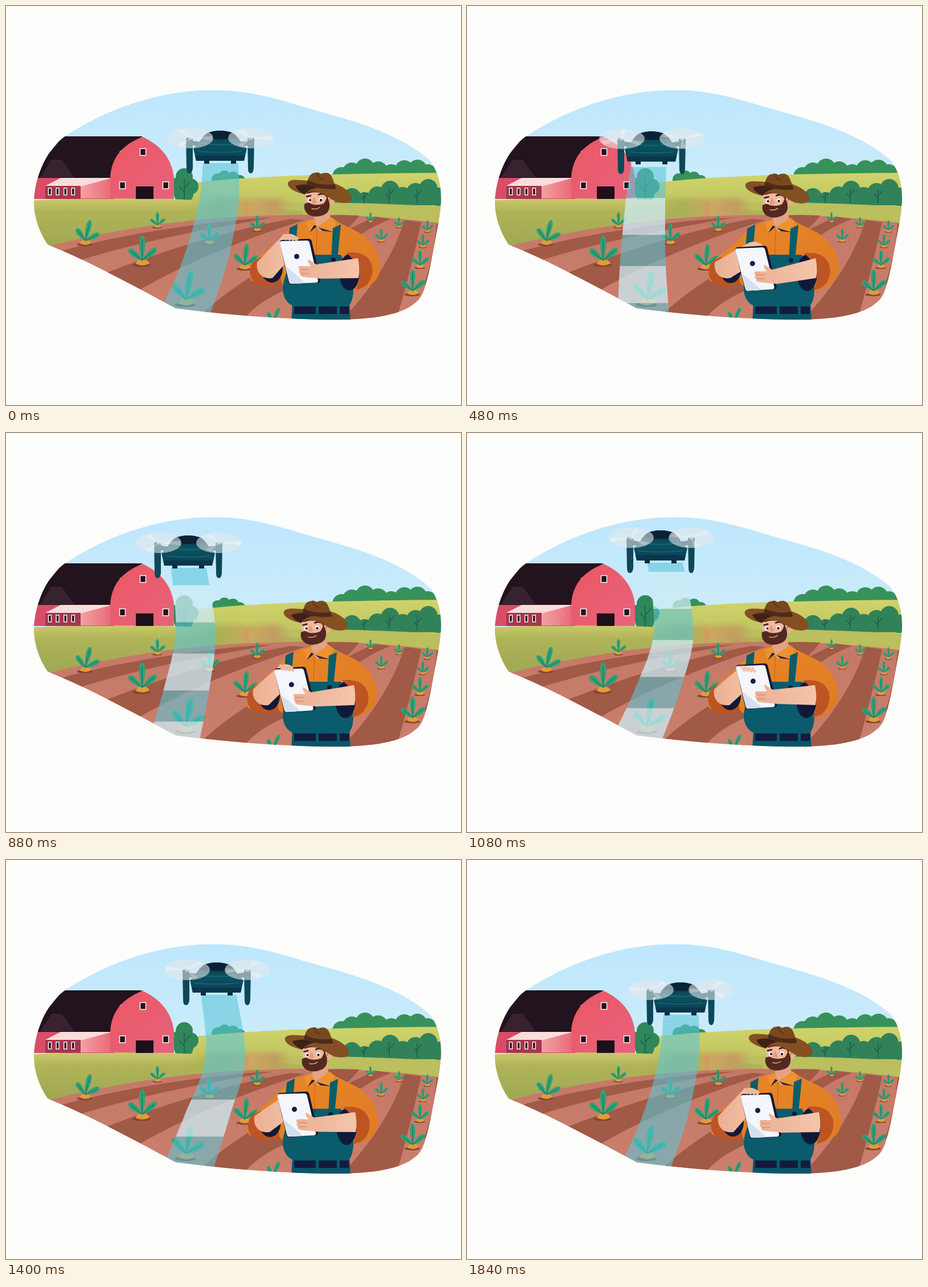
Animation of 799x701 px, one loop 1.88 s. Source, as an HTML page:

```html
<!DOCTYPE html>
<html lang="en">
<head>
<meta charset="utf-8">
<title>Smart farm</title>
<style>
  html, body { margin: 0; width: 100%; height: 100%; overflow: hidden; background: #fdfdfc; }
  svg { display: block; width: 100%; height: 100%; }
</style>
</head>
<body>
<svg viewBox="0 0 799 701" preserveAspectRatio="none">
  <defs>
    <clipPath id="blob"><path d="M49 345C50 300 72 250 105 228C190 172 285 147 365 148C440 147 500 172 560 188C640 210 700 232 745 272C769 306 765 345 760 377L745 457C736 498 731 513 718 522C695 543 640 552 565 551C480 550 390 543 298 531C230 495 150 450 73 419C58 397 49 370 49 345Z"/></clipPath>
    <clipPath id="beamClip"><path id="beamClipPath"/></clipPath>
    <linearGradient id="sky" x2="0" y2="1"><stop stop-color="#bde6fd"/><stop offset="1" stop-color="#cfedf9"/></linearGradient>
    <linearGradient id="hill" x2="0" y2="1"><stop stop-color="#d0d36b"/><stop offset="1" stop-color="#b2b957"/></linearGradient>
    <linearGradient id="meadow" x2="0" y2="1"><stop stop-color="#cbca6a"/><stop offset=".25" stop-color="#b0b458"/><stop offset="1" stop-color="#9da653"/></linearGradient>
    <linearGradient id="soil" x2="0" y2="1"><stop stop-color="#c57866"/><stop offset="1" stop-color="#ca806d"/></linearGradient>
    <linearGradient id="barn" x2="1" y2="1"><stop stop-color="#ec5763"/><stop offset="1" stop-color="#e6637c"/></linearGradient>
    <linearGradient id="shed"><stop stop-color="#f2a2a4"/><stop offset="1" stop-color="#e86572"/></linearGradient>
    <linearGradient id="hull" x2="0" y2="1"><stop stop-color="#0a2a3c"/><stop offset=".45" stop-color="#0b5260"/><stop offset="1" stop-color="#0b4054"/></linearGradient>
    <linearGradient id="shirt" x2="1" y2="1"><stop stop-color="#e98825"/><stop offset="1" stop-color="#df7a26"/></linearGradient>
    <linearGradient id="skin"><stop stop-color="#ebb094"/><stop offset="1" stop-color="#f5c5ab"/></linearGradient>
    <linearGradient id="smear"><stop stop-color="#a9b055" stop-opacity="0"/><stop offset=".3" stop-color="#a9b055"/><stop offset=".6" stop-color="#cba960"/><stop offset=".85" stop-color="#c29c60"/><stop offset="1" stop-color="#c29c60" stop-opacity="0"/></linearGradient>
    <filter id="soft" x="-20%" y="-50%" width="140%" height="200%"><feGaussianBlur stdDeviation="5"/></filter>
  </defs>
  <rect width="799" height="701" fill="#fdfdfc"/>
  <g clip-path="url(#blob)">
    <rect x="40" y="140" width="730" height="220" fill="url(#sky)"/>
    <g id="trees"></g>
    <path d="M300 314C420 298 560 295 775 293V400H300Z" fill="url(#hill)"/>
    <g id="hedge"></g>
    <path d="M330 352C470 342 620 343 775 354V400H330Z" fill="#bbbf5d"/>
    <g id="bush"></g>
    <path d="M40 342C140 336 240 337 335 341L520 360V430H40Z" fill="url(#meadow)"/>
    <path d="M322 338H500V370H322Z" fill="url(#smear)" filter="url(#soft)"/>
    <path d="M417 344H426V371H417Z" fill="#d79160" opacity=".5"/>

    <g id="barnHouse">
      <path d="M45 300H190V339H45Z" fill="#d94d66"/>
      <path d="M131 316L190 300V338H131Z" fill="url(#shed)"/>
      <path d="M69 316L98 301H190L131 317Z" fill="#f9dcdc"/>
      <path d="M69 316H131V339H69Z" fill="#a8354f"/>
      <path d="M40 302L100 229H240L200 255L184 302Z" fill="#22131e"/>
      <path d="M60 301L80 270H98L120 301Z" fill="#392230"/>
      <path d="M183 338V303C184 268 203 244 240 230C275 246 292 272 295 302V339Z" fill="url(#barn)"/>
      <path d="M228 317H259V339H228Z" fill="#1e101b"/>
    </g>

    <path d="M60 425C180 396 300 372 470 368C580 364 680 371 775 383V560H60Z" fill="url(#soil)"/>
    <g fill="#a05a46">
      <path d="M98 430C200 402 330 382 440 373L468 372C350 392 230 415 132 446Z"/>
      <path d="M178 468C270 432 390 394 500 374L525 376C420 408 320 450 236 498Z"/>
      <path d="M345 540C385 503 425 478 475 448L488 500C455 515 432 532 420 548Z"/>
      <path d="M540 369L585 367L620 368C612 380 600 390 590 400Z"/>
      <path d="M648 370L676 374C650 384 625 398 610 412L590 398Z"/>
      <path d="M700 376L729 380C718 430 704 490 684 556H585C640 500 680 440 700 376Z"/>
      <path d="M756 382H775V460L734 490C746 455 753 420 756 382Z"/>
    </g>
    <g id="plants"></g>
    <g clip-path="url(#beamClip)">
      <path id="beam" fill="#5cc6da" opacity=".58"/>
      <g id="bands"></g>
    </g>

    <g id="drone">
      <path d="M-54 21L-34 24M54 21L34 24" stroke="#0c4253" stroke-width="8"/>
      <path d="M-60 14Q-54 8 -48 14V66Q-49 75 -54 75Q-59 75 -59 66ZM48 14Q54 8 60 14L59 66Q58 75 54 75Q49 75 49 66Z" fill="#0d4858"/>
      <path d="M-28 52H-19V58H-28ZM19 52H28V58H19Z" fill="#0b2a3e"/>
      <path d="M-22 4Q0 -4 22 4C31 9 35 18 38 23L47 31L42 53H-42L-47 31L-38 23C-35 18 -31 9 -22 4Z" fill="url(#hull)"/>
      <path d="M-22 4Q0 -4 22 4Q27 8 30 13Q0 17 -30 13Q-27 8 -22 4Z" fill="#092336"/>
      <path d="M-32 22Q0 28 32 22M-39 36Q0 40 39 36" fill="none" stroke="#17697a" stroke-width="1.5"/>
      <path d="M-44 44H44L42 53H-42Z" fill="#0a364c"/>
      <g id="rotors"></g>
    </g>

    <g id="farmer">
      <path d="M503 520H603L605 556H501Z" fill="#09566a"/>
      <g id="torso">
        <path d="M528 378C512 383 500 388 492 398C480 412 462 428 440 444C428 456 426 470 430 482C450 492 470 490 484 486L500 500H595C620 503 650 492 656 468C662 438 640 410 620 398C605 390 590 384 578 376Z" fill="url(#shirt)"/>
        <path d="M436 447C424 461 427 480 440 488C454 494 472 493 484 487L480 460L450 440Z" fill="#bd5424"/>
        <ellipse cx="467" cy="461" rx="19" ry="25" fill="#11193b"/>
        <path d="M541 372L540 383L552 396L571 376L567 360H544Z" fill="#e4a286"/>
        <path d="M541 374L527 379L533 398L546 388ZM572 371L546 389L575 397L580 378Z" fill="#ec9230"/>
        <path d="M541 385L546 387L533 398ZM548 389L575 397L556 395Z" fill="#262040"/>
        <path d="M546 390L545 440" stroke="#c9681c" stroke-width="1.2"/>
      </g>
      <path d="M503 437H588C598 458 611 478 610 500Q609 521 601 527H504Q488 520 486 499C486 477 497 462 503 437Z" fill="#0a5b6b"/>
      <path d="M506 528H602V541H506Z" fill="#111c3e"/>
      <path d="M546.500 526V543M583.500 526V543" stroke="#0a5b6b" stroke-width="5"/>
      <g id="straps">
        <path d="M498 390L512 383L507 442H493ZM574 390L588 384L582 444H571Z" fill="#0a5d6b"/>
        <circle cx="575" cy="446" r="4" fill="#11193b"/>
        <ellipse cx="603" cy="468" rx="18" ry="32" fill="#11193b"/>
        <path d="M597 434C629 428 647 447 643 470C640 487 629 497 614 498C625 480 623 452 597 434Z" fill="#bd5424"/>
      </g>
      <path id="leftArm" fill="url(#skin)"/>
      <g id="tablet">
        <path d="M485 411L531 409Q536 409 537 414L552 481Q552 486 548 486L500 489Q497 489 496 485L481 416Q480 412 485 411Z" fill="#151833"/>
        <path d="M484 413L528 412Q532 412 533 416L548 482Q548 486 544 486L501 488Q498 488 497 484L481 417Q480 413 484 413Z" fill="#f4f6fc"/>
        <path d="M490 456L510 473L526 487L501 488Q498 488 497 484Z" fill="#d5e0ee"/>
        <circle cx="510.500" cy="440" r="4.500" fill="#141a44"/>
      </g>
      <path id="leftFingers" fill="none" stroke="#eeb79b" stroke-width="5" stroke-linecap="round"/>
      <path id="rightArm" fill="url(#skin)"/>
      <path id="rightFingers" fill="none" stroke="#d8916f" stroke-width="1.300"/>

      <g id="head">
        <path d="M526 326C524 342 526 357 538 364C552 370 565 360 570 348L573 322Z" fill="#f0b89c"/>
        <ellipse cx="571" cy="341" rx="7" ry="8.500" fill="#eeac90"/>
        <path d="M568 343Q569 337 574 337" fill="none" stroke="#b96c50" stroke-width="1.300"/>
        <path d="M524 348Q530 343 537 348Q548 351 558 347Q562 342 564 334L568 346Q570 362 558 367Q544 373 532 367Q522 361 524 348Z" fill="#532820"/>
        <path d="M537 356Q545 358 551 354" fill="none" stroke="#e8a88b" stroke-width="1.500" stroke-linecap="round"/>
        <path d="M541 335Q535 345 539 347Q543 348 546 345" fill="#e8987e"/>
        <path d="M526 325L534 320Q548 317 566 324L565 339L558 330Q543 325 532 329Q527 331 526 325Z" fill="#532820"/>
        <path d="M527 335L536 333M548 332Q554 328 561 332" fill="none" stroke="#30161b" stroke-width="2.500"/>
        <g fill="#fff"><ellipse cx="533" cy="341" rx="3" ry="3.500"/><ellipse cx="553" cy="340" rx="3.500" ry="3.500"/></g>
        <g fill="#1b1428"><circle cx="534" cy="341" r="2"/><circle cx="553" cy="341" r="2.200"/></g>
        <path d="M495 314C493 303 512 305 530 307L574 311C592 316 607 328 607 338C605 350 582 348 568 337C550 325 535 322 524 331C508 327 497 321 495 314Z" fill="#845022"/>
        <path d="M508 316Q530 310 550 319Q533 320 525 331Q512 326 508 316Z" fill="#3d2119"/>
        <path d="M528 313C531 300 535 293 543 293Q549 291 553 295Q565 290 571 298C576 307 577 315 580 321Q553 324 528 313Z" fill="#78491f"/>
        <path d="M530 306Q552 317 577 313L580 321Q553 324 528 313Z" fill="#4e2a19"/>
        <path d="M545 294Q550 303 557 305" fill="none" stroke="#5f3518" stroke-width="2"/>
      </g>
    </g>
  </g>
</svg>
<script>
const LOOP = 1880, STEP = 40;
const el = id => document.getElementById(id);
const set = (id, name, value) => el(id).setAttribute(name, value);
const move = (id, x, y) => set(id, 'transform', `translate(${x} ${y})`);
const add = (id, markup) => el(id).insertAdjacentHTML('beforeend', markup);

// Static details
const pane = (x, y, w, h) =>
  `<rect x="${x}" y="${y}" width="${w}" height="${h}" fill="#20121f" stroke="#fff3ed" stroke-width="1.500"/>`;
for (const [x, y] of [[199.5, 309], [275.5, 309], [235.5, 250.5]]) add('barnHouse', pane(x, y, 10, 12));
for (let i = 0; i < 4; i++) add('barnHouse', pane(74.5 + i * 13.6, 320, 5, 12));

// A bumpy row of crowns standing on a base line
function foliage(id, x0, x1, base, heights, color) {
  const gap = (x1 - x0) / heights.length, r = gap * .72;
  const crowns = heights.map((h, i) => {
    const x = Math.min(Math.max(x0 + gap * (i + .5), x0 + r), x1 - r);
    return `<circle cx="${x}" cy="${base - h + r}" r="${r}"/><rect x="${x - r}" y="${base - h + r}" width="${2 * r}" height="${Math.max(0, h - r)}"/>`;
  }).join('');
  add(id, `<g fill="${color}">${crowns}</g>`);
}
foliage('trees', 573, 757, 298, [15, 23, 30, 25, 20, 27, 28, 20], '#37915a');
foliage('trees', 361, 421, 308, [14, 19, 17, 11], '#37915a');
foliage('hedge', 574, 775, 350, [24, 30, 23, 33, 43, 32, 39, 46, 31], '#318259');
const crown = (x, y, r) => `<circle cx="${x}" cy="${y}" r="${r}"/>`;
add('bush', `<g fill="#2f875b">${crown(313, 300, 15)}${crown(324, 317, 14)}${crown(299, 316, 14)}${crown(312, 330, 17)}</g>`);
const twig = (x, y, h) => `M${x} ${y}v${-h}m0 ${h * .45}l${h * .3} ${-h * .35}m${-h * .3} ${h * .55}l${-h * .25} ${-h * .3}`;
const twigs = (id, d) => add(id, `<path d="${d}" fill="none" stroke="#1d5750" stroke-width="1.300"/>`);
twigs('hedge', twig(629, 347, 20) + twig(673, 346, 26) + twig(722, 347, 25));
twigs('bush', twig(313, 340, 36));

// Slim round-tipped leaves grow from the crown of a carrot
function plant(x, y, s, lean = 0) {
  const leaf = (angle, length) =>
    `<g transform="rotate(${angle})"><path d="M0 0C-5 ${-length * .3} -9 ${-length * .95} 0 ${-length}C9 ${-length * .95} 5 ${-length * .3} 0 0Z" fill="#2fa277"/><path d="M0 0V${-length * .85}" stroke="#177c64" stroke-width="1.500"/></g>`;
  return `<g transform="translate(${x} ${y}) scale(${s})"><ellipse cx="-1" cy="0" rx="16" ry="3.500" fill="#84453a"/>
    <path d="M-11 -2Q-9 -10 0 -10Q10 -10 13 -3Q2 4 -11 -2Z" fill="#e29c38"/>
    <g transform="translate(0 -8) rotate(${lean})">${leaf(-50, 31)}${leaf(50, 33)}${leaf(0, 44)}</g></g>`;
}
el('plants').innerHTML = [
  [139, 419, .85, 14], [239, 455, 1], [266, 389, .52], [357, 418, .68], [316, 525, 1.15, 10],
  [441, 395, .52], [419, 462, .85, 6], [640, 380, .34], [690, 389, .35], [659, 414, .45],
  [740, 397, .4], [732, 424, .44], [727, 460, .6], [714, 507, .85], [468, 561, .65, 25]
].map(p => plant(...p)).join('');

// Smooth periodic curve through key poses
const times = [0, 320, 640, 880, 1080, 1400, 1840];
function curve(keys, t) {
  const n = keys.length;
  const at = i => keys[(i + n) % n];
  const when = i => times[(i + n) % n] + Math.floor(i / n) * LOOP;
  const slope = i => (at(i + 1) - at(i - 1)) / (when(i + 1) - when(i - 1));
  let i = n - 1;
  while (times[i] > t) i--;
  const d = when(i + 1) - when(i), u = (t - when(i)) / d, v = 1 - u;
  return at(i) * (1 + 2 * u) * v * v + slope(i) * d * u * v * v
       + at(i + 1) * u * u * (3 - 2 * u) - slope(i + 1) * d * u * u * v;
}

const droneX = [376, 339, 314, 320, 340, 370, 375];
const droneY = [219, 229, 206, 180, 171, 180, 215];
const beamX = [
  [377, 332, 313, 321, 348, 374, 376],
  [373, 327, 308, 333, 363, 385, 372],
  [349, 317, 306, 317, 335, 353, 348],
  [314, 315, 303, 295, 297, 320, 313]
];
const sway = [0, .65, .95, 1, 1, .7, 0];
const tabletX = [0, -6, -11, -9, -8, -4, 0];
const tabletY = [0, 8, 14, 2, -4, -2, 0];
const handX = [493, 492, 505, 487, 488, 495, 493];
const handY = [403, 408, 423, 409, 411, 414, 403];

function beamPath(t, top) {
  const ys = [top, 350, 450, 540], xs = beamX.map(k => curve(k, t));
  const half = [31, 35, 40, 45];
  const edge = side => ys.map((y, i) => [xs[i] + side * half[i], y]);
  const smooth = pts => pts.slice(1).map((p, i) => {
    const a = pts[Math.max(0, i - 1)], b = pts[i], c = pts[Math.min(3, i + 2)];
    return `C${b[0] + (p[0] - a[0]) / 6} ${b[1] + (p[1] - a[1]) / 6} ${p[0] - (c[0] - b[0]) / 6} ${p[1] - (c[1] - b[1]) / 6} ${p[0]} ${p[1]}`;
  }).join('');
  const left = edge(-1), right = edge(1).reverse();
  return `M${left[0]}${smooth(left)}L${right[0]}${smooth(right)}Z`;
}

// Pale scan bands leave the drone at a steady pace and replace the tint
function drawBeam(t, top) {
  set('beamClipPath', 'd', beamPath(t, top));
  let tint = '', pale = '', y = 560;
  for (let i = 0; i < 5; i++) {
    const start = top - 4 + .525 * (t - 130 - 228 * i), end = start + 65;
    if (end < top || start > 560) continue;
    if (end < y) tint += `M200 ${end}H450V${y}H200Z`;
    pale += `<rect x="200" y="${start}" width="250" height="65" fill="#ccecf5" opacity=".76"/>`;
    y = start;
  }
  if (y > top) tint += `M200 ${top}H450V${y}H200Z`;
  set('beam', 'd', tint);
  el('bands').innerHTML = pale;
}

function rotor(x, t, dir) {
  const a = dir * t / 70;
  const blade = phase => {
    const c = Math.cos(a + phase), s = Math.sin(a + phase);
    return `<path d="M0 0L${38 * c - 5 * s} ${16 * s + 4 * c}L${38 * c + 5 * s} ${16 * s - 4 * c}Z" fill="#fff" opacity=".28"/>`;
  };
  return `<g transform="translate(${x} 13)"><ellipse rx="40" ry="18" fill="#e6e8ea" opacity=".58"/>${blade(0)}${blade(2.1)}${blade(4.2)}<circle r="4" cy="-1" fill="#f4f3f1" opacity=".6"/></g>`;
}

function drawArms(t, lean) {
  const hx = curve(handX, t), hy = curve(handY, t), tx = curve(tabletX, t), ty = curve(tabletY, t);
  set('leftArm', 'd', `M${441 + lean} 450C${438 + lean} 470 ${452 + lean} 481 ${468 + lean} 478L${hx + 16} ${hy + 28}L${hx + 24} ${hy + 8}Q${hx + 8} ${hy - 9} ${hx - 8} ${hy + 1}Z`);
  let fingers = '';
  for (let i = 0; i < 4; i++) fingers += `M${hx - 5 + i * 6} ${hy + i}l4 ${6 - i * .5}`;
  set('leftFingers', 'd', fingers);
  set('leftFingers', 'opacity', Math.max(0, Math.min(1, (414 - hy) / 4)));
  const x = 515 + tx, y = 457 + ty * .75, ex = 618 + lean;
  set('rightArm', 'd', `M${ex} 443L${x + 30} ${y - 3}L${x + 16} ${y - 12}Q${x + 13} ${y - 9} ${x + 20} ${y}L${x + 1} ${y}Q${x - 4} ${y + 3} ${x + 1} ${y + 6}Q${x - 3} ${y + 10} ${x + 2} ${y + 13}Q${x} ${y + 18} ${x + 8} ${y + 19}L${x + 38} ${y + 22}L${ex + 1} 478Q${ex + 4} 460 ${ex} 443Z`);
  set('rightFingers', 'd', `M${x + 1} ${y + 6}h16M${x + 2} ${y + 13}h15`);
  set('tablet', 'transform', `translate(${tx} ${ty}) rotate(${tx * .12} 515 448)`);
}

function draw(t) {
  const x = curve(droneX, t), y = curve(droneY, t), k = curve(sway, t);
  move('drone', x, y);
  el('rotors').innerHTML = rotor(-52, t, 1) + rotor(54, t, -1);
  drawBeam(t, y + 57);
  move('torso', -5 * k, k);
  move('straps', -7 * k, k);
  set('head', 'transform', `translate(${-6.5 * k} ${2 * k}) rotate(${-1.5 * k} 552 340)`);
  drawArms(t, -7 * k);
}

const origin = performance.now();
function tick() {
  const t = (performance.now() - origin) % LOOP;
  draw(Math.floor(t / STEP) * STEP);
  requestAnimationFrame(tick);
}
tick();
</script>
</body>
</html>
```
